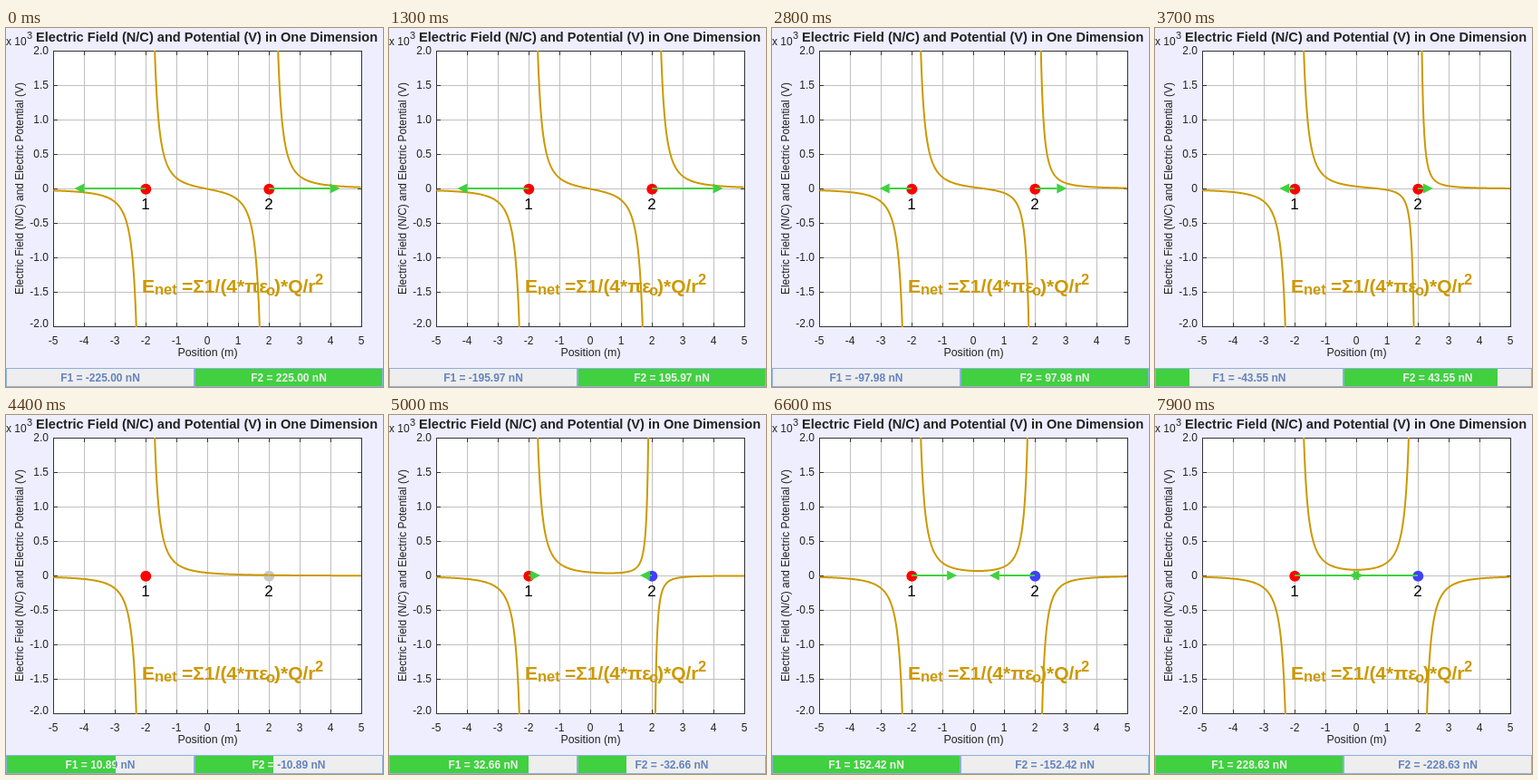
These frames come from a looping animation (416 by 396 pixels, 8 s). An HTML page with a canvas:

```html
<!DOCTYPE html>
<html lang="en">
<head>
<meta charset="utf-8">
<title>Electric field of two charges</title>
<style>
html, body { margin: 0; width: 100%; height: 100%; overflow: hidden; background: #eef; }
canvas { display: block; }
</style>
</head>
<body>
<canvas id="stage" width="416" height="396"></canvas>
<script>
const ctx = document.getElementById('stage').getContext('2d');
const FONT = '"Liberation Sans", Arial, sans-serif';
const GOLD = '#cc9900', GREEN = '#40d040', BLUE = '#6382bf';
const LOOP = 8000;
const LEFT = 52, TOP = 25, WIDTH = 340, HEIGHT = 304;

// The second charge drops by one slider step at each of these times (in 100 ms).
// The readouts usually react slightly before the plot.
const readoutTimes = [13,14,15,18,19,20,21,24,25,28,30,32,33,35,36,38,39,41,42,44,
  46,48,52,54,56,57,58,59,60,61,64,65,66,67,68,72,76,77,78,79];
const plotTimes = [14,15,16,19,20,21,22,25,26,28,31,33,34,36,37,39,40,42,43,45,
  48,50,52,54,56,58,59,60,61,62,65,66,67,68,70,74,77,78,79];

function chargeAt(ms, times) {
  const steps = times.filter(t => t * 100 <= ms).length;
  return steps ? (19 - steps) * 30 / 31 : 20;
}
const force = charge => 9 * 20 * charge / 16;
const px = x => 222 + 34 * x;
const py = e => 177 - 0.076 * e;

function text(str, x, y, size, { color = '#222', align = 'left', bold = false } = {}) {
  ctx.font = `${bold ? 'bold ' : ''}${size}px ${FONT}`;
  ctx.fillStyle = color;
  ctx.textAlign = align;
  ctx.fillText(str, x, y);
}

function rect(x, y, w, h, color) {
  ctx.fillStyle = color;
  ctx.fillRect(x, y, w, h);
}

function clipped(x, y, w, h, draw) {
  ctx.save();
  ctx.beginPath();
  ctx.rect(x, y, w, h);
  ctx.clip();
  draw();
  ctx.restore();
}

function drawAxes() {
  const right = LEFT + WIDTH, bottom = TOP + HEIGHT;
  rect(LEFT, TOP, WIDTH, HEIGHT, '#fff');
  for (let i = 0; i <= 10; i++) {
    const x = LEFT + 34 * i;
    rect(x, TOP, 1, HEIGHT, '#c0c0c0');
    rect(x, TOP, 1, 5, '#333');
    rect(x, bottom - 4, 1, 5, '#333');
    text(String(i - 5), x, 349, 12, { align: 'center' });
  }
  for (let i = 0; i <= 8; i++) {
    const y = TOP + 38 * i, value = 2 - i / 2;
    rect(LEFT, y, WIDTH, 1, '#c0c0c0');
    rect(LEFT, y, 5, 1, '#333');
    rect(right - 4, y, 5, 1, '#333');
    text(value ? value.toFixed(1) : '0', 47, y + (i === 8 ? 1 : 4), 12, { align: 'right' });
  }
  ctx.strokeStyle = '#333';
  ctx.lineWidth = 1;
  ctx.strokeRect(LEFT + 0.5, TOP + 0.5, WIDTH, HEIGHT);

  text('Electric Field (N/C) and Potential (V) in One Dimension', 33, 15, 14.6, { bold: true });
  text('x 10', 0, 19, 12);
  text('3', 23, 12, 11);
  text('Position (m)', 222.5, 362, 12.4, { align: 'center' });
  ctx.save();
  ctx.translate(19, 294);
  ctx.rotate(-Math.PI / 2);
  text('Electric Field (N/C) and Electric Potential (V)', 0, 0, 11.9);
  ctx.restore();
}

function drawFormula() {
  const style = { color: GOLD, bold: true };
  text('E', 150, 292, 21, style);
  text('net', 164, 294, 16.5, style);
  text('=Σ1/(4*πε', 194, 292, 21, style);
  text('o', 287, 295, 16.5, style);
  text(')*Q/r', 296, 292, 21, style);
  text('2', 341, 283, 16.5, style);
}

function drawArrow(x, length) {
  if (!length) return;
  const dir = Math.sign(length);
  const tip = x + length + 2 * dir;
  const head = Math.min(11, Math.abs(tip - x));
  const base = tip - dir * head, half = head / 2;
  rect(Math.min(x, base), 176, Math.abs(base - x), 2, GREEN);
  ctx.beginPath();
  ctx.moveTo(tip, 177);
  ctx.lineTo(base, 177 - half);
  ctx.lineTo(base, 177 + half);
  ctx.fill();
}

function drawCharge(x, charge, label) {
  ctx.fillStyle = charge > 0 ? '#f00' : charge < 0 ? '#4040ff' : '#c8c8c8';
  ctx.beginPath();
  ctx.arc(x + 0.3, 177.7, 6, 0, 2 * Math.PI);
  ctx.fill();
  text(label, x, 200, 17, { color: '#000', align: 'center' });
}

function drawField(charge) {
  const pointField = (q, d) => 9 * q * Math.sign(d) / (d * d);
  const curve = new Path2D();
  for (const [from, to] of [[-5, -2], [-2, 2], [2, 5]]) {
    const first = from + 0.01;
    for (let x = first; x < to; x += 0.02) {
      const e = pointField(20, x + 2) + pointField(charge, x - 2);
      const y = py(Math.max(-4000, Math.min(4000, e))) + 0.5;
      if (x === first) curve.moveTo(px(x), y);
      else curve.lineTo(px(x), y);
    }
  }
  ctx.strokeStyle = GOLD;
  ctx.lineWidth = 2;
  ctx.lineJoin = 'round';
  clipped(LEFT, TOP, WIDTH + 1, HEIGHT + 1, () => ctx.stroke(curve));
}

function drawBar(x, name, value) {
  const fill = 206 * Math.max(0, Math.min(1, 0.5 + value / 135));
  const label = color => text(`${name} = ${value.toFixed(2)} nN`, x + 104, 389.5, 12,
    { color, align: 'center', bold: true });
  rect(x, 375, 208, 21, '#8fb0da');
  rect(x + 1, 376, 206, 19, '#eee');
  label(BLUE);
  clipped(x + 1, 376, Math.round(fill), 19, () => {
    rect(x + 1, 376, 206, 19, GREEN);
    label('#eee');
  });
}

function render(ms) {
  const charge = chargeAt(ms, plotTimes);
  const reading = force(chargeAt(ms, readoutTimes));
  const arrow = 0.34 * force(charge);
  rect(0, 0, 416, 396, '#eef');
  drawAxes();
  drawFormula();
  drawCharge(154, 20, '1');
  drawCharge(290, charge, '2');
  drawField(charge);
  drawArrow(154, -arrow);
  drawArrow(290, arrow);
  drawBar(0, 'F1', reading ? -reading : 0);
  drawBar(208, 'F2', reading);
}

const start = performance.now();
function tick() {
  render((performance.now() - start) % LOOP);
  requestAnimationFrame(tick);
}
tick();
</script>
</body>
</html>
```
